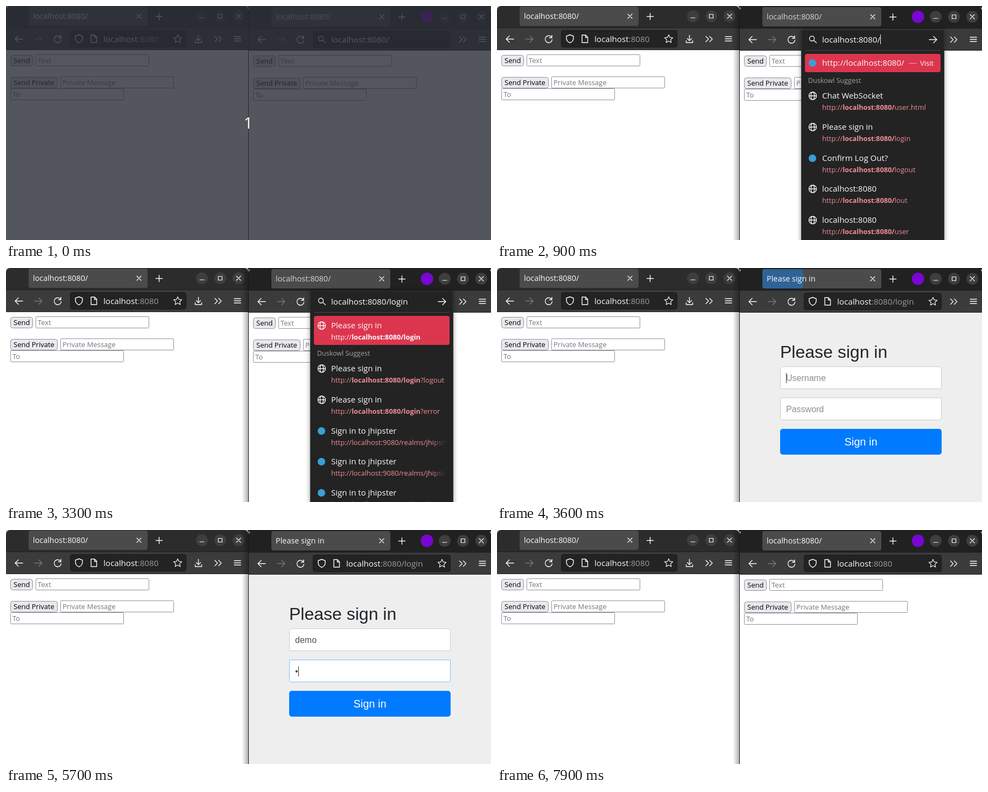
Animation of 901x435 px, one loop 8 s. Source, as an HTML page with a canvas:

```html
<!DOCTYPE html>
<html lang="en">
<head>
<meta charset="utf-8">
<title>Sign in</title>
<style>
html, body { margin: 0; width: 100%; height: 100%; overflow: hidden; background: #fff; }
canvas { display: block; }
</style>
</head>
<body>
<canvas id="stage" width="901" height="435"></canvas>
<script>
const ctx = document.getElementById('stage').getContext('2d');
const LOOP = 8000, STEP = 100;
const UI = '"Open Sans", "Noto Sans", sans-serif';
const SANS = '"Liberation Sans", Arial, sans-serif';
const LIGHT = '#fbfbfe', GREY = '#9b9b9f', PINK = '#f08c97', RED = '#dc364f';

const ICON = {
  back: 'M7 0H-7M-1-6L-7 0L-1 6',
  go: 'M-7 0H7M1-6L7 0L1 6',
  reload: 'M5-4A6.5 6.5 0 1 0 6.5 1M6-7V-2.5H1.5',
  undo: 'M-5-4A6.5 6.5 0 1 1-6.5 1M-6-7V-2.5H-1.5',
  shield: 'M0-7.5L6.5-5V-1C6.5 3 3.5 6 0 7.5C-3.5 6-6.5 3-6.5-1V-5Z',
  doc: 'M-5-7H1.5L5.5-3V7H-5ZM1.5-7V-2.5H5.5',
  search: 'M2.5-1.5A4.5 4.5 0 1 0-6.5-1.5A4.5 4.5 0 1 0 2.5-1.5M1.5 2L6.5 6.5',
  download: 'M0-7V3M-4-1L0 3L4-1M-6 3V6.5H6V3',
  more: 'M-6-5L-1 0L-6 5M1-5L6 0L1 5',
  menu: 'M-6-4.5H6M-6-.5H6M-6 3.5H6',
  cross: 'M-4-4L4 4M4-4L-4 4',
  plus: 'M-6 0H6M0-6V6',
  min: 'M-4 3H4',
  max: 'M-3.5-3.5H3.5V3.5H-3.5Z',
  globe: 'M7 0A7 7 0 1 0-7 0A7 7 0 1 0 7 0M3.2 0A3.2 7 0 1 0-3.2 0A3.2 7 0 1 0 3.2 0M-7 0H7',
  star: Array.from({ length: 10 }, (_, i) => {
    const r = i % 2 ? 3.8 : 8, a = i * Math.PI / 5;
    return `${i ? 'L' : 'M'}${r * Math.sin(a)} ${-r * Math.cos(a)}`;
  }).join('') + 'Z'
};

const HOST = 'http://*localhost:8080/';
const REALM = ['Sign in to jhipster', 'http://localhost:9080/realms/jhipster/', 1];
const OPEN_ROWS = [
  ['Chat WebSocket', HOST + '*user.html'],
  ['Please sign in', HOST + '*login'],
  ['Confirm Log Out?', HOST + '*logout', 1],
  ['localhost:8080', HOST + '*lout'],
  ['localhost:8080', HOST + '*user']
];

// Last value whose start time has passed
function at(t, ...steps) {
  let value;
  for (const [start, v] of steps) if (t >= start) value = v;
  return value;
}

function clamp(v) { return Math.max(0, Math.min(1, v)); }

function mix(a, b, p) {
  return `rgb(${a.map((v, i) => Math.round(v + (b[i] - v) * clamp(p)))})`;
}

function rect(x, y, w, h, color) {
  ctx.fillStyle = color;
  ctx.fillRect(x, y, w, h);
}

function box(x, y, w, h, r, fill, line) {
  ctx.beginPath();
  const o = line ? 0.5 : 0;
  ctx.roundRect(x + o, y + o, w - 2 * o, h - 2 * o, r);
  ctx.fillStyle = fill;
  ctx.fill();
  if (line) {
    ctx.lineWidth = 1;
    ctx.strokeStyle = line;
    ctx.stroke();
  }
}

function disc(x, y, r, color) {
  ctx.beginPath();
  ctx.arc(x, y, r, 0, 7);
  ctx.fillStyle = color;
  ctx.fill();
}

function icon(name, x, y, color = LIGHT, width = 1.4) {
  ctx.save();
  ctx.translate(x, y);
  ctx.strokeStyle = color;
  ctx.lineWidth = width;
  ctx.lineJoin = ctx.lineCap = 'round';
  ctx.stroke(new Path2D(ICON[name]));
  ctx.restore();
}

// Draws text and returns the x where it ends
function text(s, x, y, size, color, family = UI, weight = 400) {
  ctx.font = `${weight} ${size}px ${family}`;
  ctx.fillStyle = color;
  ctx.fillText(s, x, y);
  return x + ctx.measureText(s).width;
}

function caret(x, y, h, color) {
  rect(Math.round(x), y, 1, h, color);
}

function burst(start, t) {
  const p = (t - start) / 375;
  if (p < 0 || p >= 0.93) return;
  const e = 1 - (1 - p) ** 2;
  ctx.save();
  ctx.beginPath();
  ctx.roundRect(42, 1, 221, 36, 4);
  ctx.clip();
  disc(58, 19, 245 * e, `rgba(10,132,255,${0.55 * (1 - e)})`);
  ctx.restore();
}

function chrome(w) {
  box(0, 0, 450, 60, [8, 8, 0, 0], w.strip);
  rect(0, 41, 450, 41, '#3b3b3b');
  rect(0, 40, 450, 1, '#1d1d1d');
  rect(0, 81, 450, 1, '#252525');
  box(42, 1, 221, 36, 4, '#4b4b4b');
  if (w.burst !== undefined) burst(w.burst, w.time);
  if (w.busy) disc(56.5, 19, 2, '#a5a5a5');
  text(w.title, w.busy ? 71 : 50, 24, 14.4, w.titleColor || LIGHT);
  icon('cross', 247, 19, LIGHT, 1.2);
  icon('plus', 284.5, 19.5);
  for (const [name, x] of [['min', 364], ['max', 398], ['cross', 432]]) {
    disc(x, 19, 11, '#3e3e3e');
    icon(name, x, 19, LIGHT, 1.2);
  }
  icon('back', 24, 61.5);
  icon('back', -60, 61.5, 'transparent');
  icon('go', 60, 61.5, '#777');
  icon(w.busy ? 'undo' : 'reload', 96, 61.5);
  box(119, 45, w.field, 32, 4, '#232323', '#181818');
  if (w.query !== undefined) {
    icon('search', 136, 61, LIGHT, 1.3);
    const x = text(w.query, 153, 67, 15.2, LIGHT);
    if (w.caret) caret(x, 53, 17, LIGHT);
  } else {
    icon('shield', 135.5, 61);
    icon('doc', 163, 61);
    text(w.path, text('localhost', 181, 67, 15.2, LIGHT), 67, 15.2, GREY);
    icon('star', 119 + w.field - 16, 61.5, LIGHT, 1.2);
  }
}

function chatPage() {
  const line = '#8f8f9d', hint = '#757575';
  rect(0, 82, 450, 354, '#fff');
  const button = (s, y, w) => {
    box(8, y, w, 21, 4, '#e9e9ed', line);
    text(s, 14, y + 15, 13, '#000');
  };
  const input = (s, x, y) => {
    box(x, y, 211, 22, 1, '#fff', line);
    text(s, x + 4, y + 16, 13, hint);
  };
  button('Send', 91, 42);
  input('Text', 55, 90);
  button('Send Private', 132, 88);
  input('Private Message', 101, 131);
  input('To', 8, 153);
}

function signInPage(t) {
  const plain = [200, 203, 207], focus = [128, 189, 255];
  const hint = '#868e96', ink = '#495057';
  rect(451, 83, 450, 352, '#eee');
  text('Please sign in', 526, 167, 32, '#212529', SANS);

  const toUser = (t - 3600) / 150, toPass = (t - 5250) / 150;
  const userLine = t < 5300 ? mix(plain, focus, toUser) : mix(focus, plain, toPass);
  const passLine = t < 7300 ? mix(plain, focus, toPass) : mix(plain, plain, 0);
  box(526, 183, 300, 42, [4, 4, 0, 0], '#fff', userLine);
  box(526, 241, 300, 42, [0, 0, 4, 4], '#fff', passLine);

  const name = at(t, [0, ''], [4700, 'de'], [4800, 'dem'], [4900, 'demo']);
  const end = text(name || 'Username', 537, 210, 16, name ? ink : hint, SANS);
  if (t < 4300 || (t >= 4700 && t < 5300)) caret(name ? end : 537, 195, 19, '#333');

  const count = at(t, [0, 0], [5700, 1], [5800, 2], [6000, 3], [6200, 4]);
  const stop = text('•'.repeat(count) || 'Password', 537, 268, 16, count ? ink : hint, SANS);
  if (t >= 5300 && t < 6400) caret(count ? stop : 537, 253, 19, '#333');

  if (t >= 7300) box(523, 296, 306, 54, 7, '#80bdff');
  box(526, 299, 300, 48, 4.8, mix([0, 123, 255], [0, 105, 217], (t - 6550) / 150));
  ctx.textAlign = 'center';
  text('Sign in', 676, 330, 20, '#fff', SANS);
  ctx.textAlign = 'left';
}

// Asterisks switch bold on and off
function link(s, y, color) {
  let x = 604;
  s.split('*').forEach((part, i) => {
    x = i % 2 ? text(part, x, y, 12.8, color, UI, 700) : text(part, x, y, 13, color);
  });
}

function mark(service, y) {
  if (service) disc(586, y, 7, '#3a9fd6');
  else icon('globe', 586.5, y, LIGHT, 1.3);
}

function row([title, url, service], y, color) {
  mark(service, y);
  text(title, 604, y + 5, 15, LIGHT);
  link(url, y + 26, color);
}

function dropdown(t, typed) {
  const top = t < 1000 ? 44 : 42;
  ctx.save();
  ctx.shadowColor = 'rgba(0,0,0,.45)';
  ctx.shadowBlur = 8;
  box(565, top, 266, 420, 4, '#232323');
  ctx.restore();
  box(565, top, 266, 420, 4, '#232323', '#333');
  icon('search', 587, 62, LIGHT, 1.3);
  const x = text('localhost:8080/' + typed, 604, 68, 15.2, LIGHT);
  if (t < 3300) caret(x, 53, 18, LIGHT);
  icon('go', 810, 62.5);
  rect(573, 82, 251, 1, '#484848');

  let y = 167, rows = OPEN_ROWS;
  if (typed) {
    y = 187;
    const rest = 'login'.slice(typed.length);
    const login = HOST + typed + '*' + rest;
    box(572, 89, 252, 54, 4, RED);
    row(['Please sign in', login], 107, LIGHT);
    rows = [
      ['Please sign in', login + '?logout'],
      typed.length > 2 ? ['Please sign in', login + '?error'] : ['Confirm Log Out?', HOST + typed + '*' + 'logout'.slice(typed.length), 1],
      REALM, REALM, REALM
    ];
  } else {
    box(572, 89, 252, 34, 4, RED);
    mark(1, 106);
    text('http://localhost:8080/', 604, 111, 15.2, LIGHT);
    text('—', 765, 111, 15, '#f0a0aa');
    text('Visit', 786, 111, 13, LIGHT);
  }
  text('Duskowl Suggest', 578, y - 24, 12.5, '#a2a2a4');
  const fade = ctx.createLinearGradient(790, 0, 817, 0);
  fade.addColorStop(0, PINK);
  fade.addColorStop(1, 'rgba(240,140,151,0)');
  rows.forEach((r, i) => row(r, Math.round(y + i * 57.8), r === REALM ? fade : PINK));
}

function leftWindow() {
  chrome({ strip: '#2c2c2c', title: 'localhost:8080/', field: 216, path: ':8080' });
  icon('download', 357.5, 61.5);
  icon('more', 394, 61.5);
  icon('menu', 430, 61.5);
  chatPage();
}

function rightWindow(t) {
  const typed = at(t, [0, ''], [1800, 'l'], [2000, 'lo'], [2600, 'log'], [2700, 'logi'], [2900, 'login']);
  const signIn = t >= 3600 && t < 7500;
  const w = {
    time: t, field: 256,
    strip: t < 900 ? '#2c2c2c' : '#212121',
    title: signIn ? 'Please sign in' : 'localhost:8080/',
    titleColor: t < 3600 ? '#d4d4d8' : LIGHT,
    busy: t === 3500 || t === 7400,
    burst: at(t, [0, undefined], [3600, 3550], [7500, 7500]),
    path: signIn || t === 3500 ? ':8080/login' : ':8080'
  };
  if (t < 3500) {
    w.query = 'localhost:8080/' + typed;
    w.caret = t >= 400;
  }
  ctx.save();
  ctx.translate(451, 1);
  rect(0, -1, 450, 3, w.strip);
  chrome(w);
  disc(331, 19, 11.5, '#7a06d2');
  icon('more', 397.5, 61.5);
  icon('menu', 434, 61.5);
  if (!signIn) chatPage();
  ctx.restore();
  if (signIn) signInPage(t);
  if (t >= 900 && t < 3500) dropdown(t, typed);

  if (t >= 900) {
    const shade = ctx.createLinearGradient(438, 0, 450, 0);
    shade.addColorStop(0, 'rgba(0,0,0,0)');
    shade.addColorStop(1, 'rgba(0,0,0,.3)');
    rect(438, 0, 12, 435, shade);
  }
  rect(450, 0, 1, 435, '#161616');
}

function draw(t) {
  rect(0, 0, 901, 435, '#d8d8d8');
  leftWindow();
  rightWindow(t);
  if (t < 100) {
    rect(0, 0, 901, 435, 'rgba(40,44,52,.8)');
    ctx.textAlign = 'center';
    text('1', 450, 228, 29, '#fff');
    ctx.textAlign = 'left';
  }
}

const begin = performance.now();
function tick() {
  const t = (performance.now() - begin) % LOOP;
  draw(Math.floor(t / STEP) * STEP);
  requestAnimationFrame(tick);
}
tick();
</script>
</body>
</html>
```
